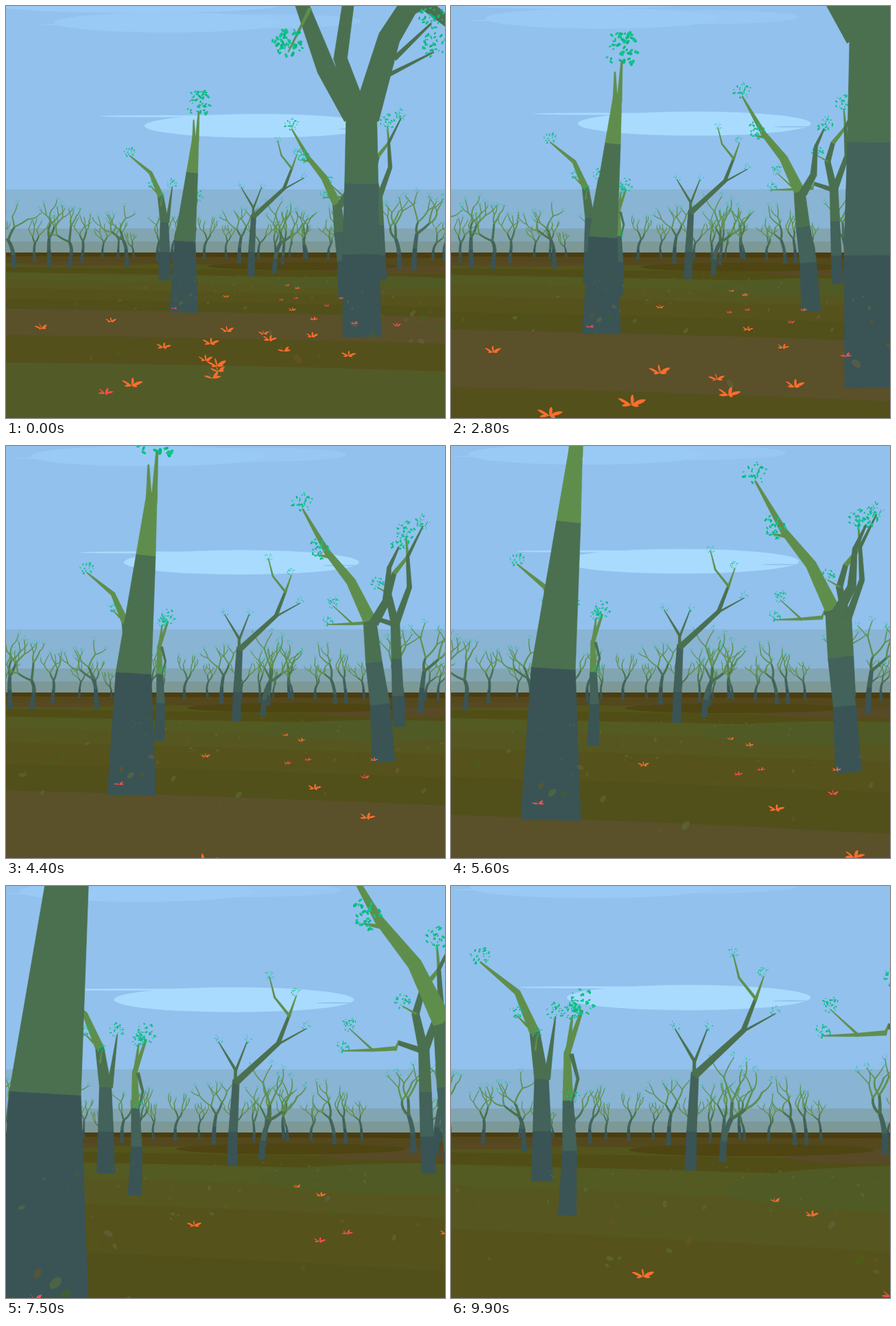
These frames come from a looping animation (640x600 px, 10 s). An HTML page with a canvas:

```html
<!DOCTYPE html>
<html lang="en">
<head>
<meta charset="utf-8">
<title>Forest walk</title>
<style>
html, body { margin: 0; width: 100%; height: 100%; overflow: hidden; background: #92c1ed; }
canvas { display: block; width: 640px; height: 600px; }
</style>
</head>
<body>
<canvas id="stage" width="640" height="600"></canvas>
<script>
const ctx = document.getElementById('stage').getContext('2d');
const W = 640, H = 600, HORIZON = 359, LOOP = 10000, STEP = 100, SPEED = 1.09, NEAR = .6;
const BARK = ['#3a5456', '#42625a', '#4b7050', '#5f8e4c'];
const LEAF = ['#06b97f', '#12c28c'];

function seeded(seed) {
  let a = seed * 2654435761 >>> 0;
  return () => {
    a = a + 0x6D2B79F5 | 0;
    let t = Math.imul(a ^ a >>> 15, 1 | a);
    t ^= t + Math.imul(t ^ t >>> 7, 61 | t);
    return ((t ^ t >>> 14) >>> 0) / 4294967296;
  };
}

// Where the walking direction lies on screen as the head turns: seconds, x.
const TURNS = [[0, 328], [1.5, 316.7], [2.8, 313], [4.4, 301], [6.7, 287], [8.4, 295], [10, 303.5]];

function heading(sec) {
  const last = TURNS.length - 1;
  const slope = i => {
    const a = TURNS[Math.max(0, i - 1)], b = TURNS[Math.min(last, i + 1)];
    return (b[1] - a[1]) / (b[0] - a[0]);
  };
  let i = 0;
  while (i < last - 1 && sec > TURNS[i + 1][0]) i++;
  const [t0, a] = TURNS[i], [t1, b] = TURNS[i + 1], d = t1 - t0, u = (sec - t0) / d;
  const ease = u * u * (3 - 2 * u);
  return a + (b - a) * ease + d * u * (1 - u) * ((1 - u) * slope(i) - u * slope(i + 1));
}

// Tree parts are measured in eye heights, with y pointing up.
function tuft(x, y, r, count = 28) {
  const rnd = seeded(Math.round(x * 91 + y * 337 + 1000));
  return LEAF.map(fill => {
    const path = new Path2D();
    for (let i = 0; i < count / 2; i++) {
      const a = rnd() * 6.28, d = r * Math.sqrt(rnd()), turn = rnd() * 3;
      const px = x + Math.cos(a) * d, py = y + Math.sin(a) * d, rx = r * (.07 + rnd() * .11);
      path.moveTo(px + rx * Math.cos(turn), py + rx * Math.sin(turn));
      path.ellipse(px, py, rx, rx * .55, turn, 0, 6.3);
    }
    return { path, fill };
  });
}

// A tapering limb, one bark shade per segment; thin tips carry leaves.
function limb(shades, w0, w1, pts, r = .15, leaves = 28) {
  const run = [0];
  for (let i = 1; i < pts.length; i++)
    run.push(run[i - 1] + Math.hypot(pts[i][0] - pts[i - 1][0], pts[i][1] - pts[i - 1][1]));
  const total = run[pts.length - 1];
  const sides = pts.map(([x, y], i) => {
    const a = pts[Math.max(0, i - 1)], b = pts[Math.min(pts.length - 1, i + 1)];
    const w = w0 + (w1 - w0) * (run[i] / total) ** 1.2;
    const k = w / 2 / Math.hypot(b[0] - a[0], b[1] - a[1]);
    const nx = (a[1] - b[1]) * k, ny = (b[0] - a[0]) * k;
    return [[x + nx, y + ny], [x - nx, y - ny]];
  });
  const parts = sides.slice(1).map((s, i) => {
    const path = new Path2D(), q = sides[i];
    path.moveTo(...q[0]);
    path.lineTo(...s[0]);
    path.lineTo(...s[1]);
    path.lineTo(...q[1]);
    path.closePath();
    return { path, fill: BARK[shades[Math.min(i, shades.length - 1)]], edge: true };
  });
  const [x, y] = pts[pts.length - 1];
  return w1 < .04 && r ? parts.concat(tuft(x, y + r * .6, r, leaves)) : parts;
}

// Branches fork, bow outwards and bend back towards the light.
function grow(seed) {
  const rnd = seeded(seed), parts = [];
  function branch(x, y, angle, w, level) {
    const len = (1.1 - .08 * level) * (.7 + rnd() * .6);
    const bend = -angle * .6 + (rnd() - .5) * (level ? 1.1 : .3);
    const tip = level > 3 ? .02 : w * .75, pts = [[x, y]];
    for (let i = 1; i < 5; i++) {
      const a = angle + bend * i / 4;
      pts.push([x += Math.sin(a) * len / 4, y += Math.cos(a) * len / 4]);
    }
    parts.push(...limb([Math.min(level, 3)], w, tip, pts, .17, 12));
    if (level > 3) return;
    const end = angle + bend;
    if (!level) return branch(x, y, end, tip, 1);
    branch(x, y, end + .35 + rnd() * .5, tip * .8, level + 1);
    if (level < 3 || rnd() > .4) branch(x, y, end - .35 - rnd() * .6, tip * .7, level + 1);
  }
  branch(0, 0, (rnd() - .5) * .16, .31, 0);
  return parts;
}

const spire = [
  limb('023', .47, .1, [[0, 0], [.02, 1.19], [.14, 2.34], [.2, 2.95]]),
  limb('3', .06, .015, [[.17, 2.85], [.165, 3.22]], 0),
  limb('3', .06, .02, [[.22, 2.85], [.25, 3.36]], .22, 40)
];

const giant = [
  limb('012', .46, .36, [[0, 0], [-.02, .98], [-.01, 1.82], [-.01, 2.74]]),
  limb('2', .26, .08, [[-.1, 2.62], [-.43, 3.18], [-.72, 3.95], [-.95, 4.8]]),
  limb('2', .18, .09, [[-.06, 2.75], [-.26, 3.3], [-.16, 4], [-.05, 5]]),
  limb('2', .32, .14, [[.04, 2.6], [.32, 3.55], [.66, 4.1], [1.2, 4.8]]),
  limb('2', .18, .08, [[.45, 3.85], [.75, 3.95], [1.3, 3.5]]),
  limb('2', .05, .015, [[.26, 3.08], [.85, 3.38]]),
  limb('2', .06, .02, [[.38, 3.3], [.82, 3.72]]),
  limb('3', .04, .012, [[-.62, 3.9], [-.88, 3.38]], .19, 44)
];

const hooked = [
  limb('01233', .44, .03, [[0, 0], [0, 1.03], [-.01, 2.12], [-.15, 3.07], [-.51, 3.9], [-1.28, 4.53]], .2),
  limb('2', .14, .02, [[.1, 2.1], [.28, 3.4]], .18),
  limb('3', .05, .015, [[-.3, 3.2], [-.52, 3.42]]),
  limb('3', .04, .015, [[-.14, 2.7], [-.1, 3]], .12)
];

const slim = [
  limb('0133', .22, .03, [[0, 0], [.03, .78], [.01, 1.39], [0, 1.96], [.18, 2.48]], .16, 44),
  limb('3', .07, .02, [[0, 1.9], [.06, 2.4]], .1),
  limb('2', .05, .02, [[.05, 1.95], [.13, 1.65], [.07, 1.4]], .08)
];

const forked = [
  limb('01', .3, .2, [[0, 0], [.03, 1.03], [.12, 2.6]]),
  limb('2233', .2, .02, [[.1, 2.5], [1.4, 3.7], [1.73, 4.55], [1.29, 5.1], [1.14, 5.7]], .14, 18),
  limb('3', .08, .02, [[1.72, 4.5], [1.95, 5.15]], .16, 18),
  limb('2', .06, .02, [[1.35, 3.65], [2.25, 4.15]], .14, 18),
  limb('2', .1, .02, [[.1, 2.5], [.1, 2.9], [-.41, 3.75]], .14, 16),
  limb('2', .07, .02, [[.1, 2.85], [.45, 3.75]], .14, 16)
];

const leaning = [
  limb('012333', .33, .02, [[0, 0], [-.05, .83], [-.14, 1.44], [-.2, 2.04], [-.47, 2.6], [-.81, 3.02], [-1.17, 3.65]]),
  limb('2', .14, .02, [[-.14, 2], [.04, 2.32], [.08, 2.8], [.22, 3.1]]),
  limb('3', .05, .015, [[-.75, 2.95], [-.94, 2.98]])
];

const crooked = [
  limb('012', .35, .26, [[0, 0], [-.04, .9], [-.08, 2], [-.12, 3.1]]),
  limb('2233', .24, .03, [[-.12, 3], [-.32, 3.9], [-.15, 4.5], [.25, 5], [.2, 5.6]], .28),
  limb('2', .2, .03, [[-.1, 3], [.3, 4.1], [.25, 5], [.7, 5.9]], .22),
  limb('2333', .14, .02, [[-.15, 3], [-.75, 3.2], [-.8, 3.06], [-1.4, 3.02], [-2.1, 3]], .17),
  limb('3', .05, .015, [[-1.35, 3], [-1.95, 3.55]], .17),
  limb('3', .05, .015, [[-.3, 3.9], [-.65, 4.1]], .2)
];

const trees = [];
const plant = (parts, x, z, size = 1) => trees.push({ parts: parts.flat(), x, z, size });

plant(spire, -.79, 11.49);
plant(giant, 1.56, 8.15);
plant(hooked, -2.42, 25);
plant(slim, -1.11, 19.1);
plant(forked, .84, 29);
plant(leaning, 2.47, 14.7);
plant(crooked, 5.5, 25);
plant(grow(5), -7.2, 47.5, .9);
plant(grow(8), 2.15, 34, .8);
plant(grow(21), 4.35, 58, .9);
plant(grow(13), 12.9, 120, 1.7);

// The grove fans out over all bearings, close by only at the sides.
const rndGrove = seeded(31);
for (let bearing = -345; bearing < 350; bearing += 25) {
  const side = Math.abs(bearing) > 225;
  const z = (side ? 20 : 62) + rndGrove() * (side ? 85 : 90);
  plant(grow(bearing + 900), (bearing + rndGrove() * 16) * z / 1000, z, .65 + rndGrove() * .35 + z / 400);
}
trees.sort((a, b) => b.z - a.z);

// Ground stripes, far to near: colour and distance.
const STRIPES = [
  ['#4c3d10', 1e4], ['#55491a', 150], ['#54481f', 90], ['#53551a', 56], ['#504e16', 40],
  ['#535a22', 29], ['#565720', 22], ['#56521b', 17.2], ['#514f1a', 13.6], ['#5a5029', 11.35],
  ['#54501b', 7.9], ['#525a28', 6]
];
// Ground patches: colour, place, distance, half width, half depth.
const PATCHES = [
  ['#594a27', 9.4, 39, 4.2, 8], ['#584823', -13, 62, 6, 12],
  ['#4e4512', 5.3, 50, 7, 14], ['#505a25', 4.5, 23, 3.3, 5]
];

function flower(x, z, seed) {
  const rnd = seeded(seed), path = new Path2D(), turn = rnd() * 6, lift = .1 + rnd() * .2;
  for (let k = 0; k < 5; k++) {
    const a = turn + k * 1.257, px = Math.cos(a), py = Math.sin(a) * .42 + lift;
    path.moveTo(0, -.1);
    path.quadraticCurveTo(px * .55 - py * .35, py * .6 + .22, px, py);
    path.quadraticCurveTo(px * .6 + py * .35, py * .4 - .24, 0, -.1);
  }
  const red = rnd() > .8;
  return { x, z, path, r: red ? .06 : .065 + rnd() * .035, fill: red ? '#f9504c' : '#ff6d2e' };
}

// A few flowers mark the path, the rest lie scattered at its start.
const blooms = [
  [-.11, 15.6], [-1.02, 12.3], [1.07, 12], [1.06, 14.5], [1.42, 15],
  [1.85, 19.1], [1.7, 20.8], [1.24, 10.3], [1.8, 12.9], [2.4, 15]
].map(([x, z], i) => flower(x, z, i + 400));
const rndBloom = seeded(12);
for (let i = 0; i < 18; i++) {
  const z = 4.9 + i * .3;
  blooms.push(flower((rndBloom() * 560 - 310) * z / 1000, z, i + 500));
}

const rndLitter = seeded(77);
const litter = Array.from({ length: 130 }, () => ({
  x: (rndLitter() - .45) * 7, y: rndLitter() * .2, z: 5 + rndLitter() * 24,
  r: .015 + rndLitter() * .03, turn: rndLitter() * 3,
  fill: ['#476318', '#5c7038', '#6a5522', '#6b6044'][rndLitter() * 4 | 0]
}));

function oval(fill, x, y, rx, ry, turn = 0) {
  ctx.fillStyle = fill;
  ctx.beginPath();
  ctx.ellipse(x, y, rx, ry, turn, 0, 7);
  ctx.fill();
}

function bar(fill, y) {
  ctx.fillStyle = fill;
  ctx.fillRect(0, y, W, H - y);
}

function drawSky(sec, cx) {
  bar('#92c1ed', 0);
  const g = 177 / (177 - SPEED * sec);
  const cloud = (fill, x, y, rx, ry) =>
    oval(fill, cx + (x - 328) * g, HORIZON + (y - HORIZON) * g, rx * g, ry * g);
  cloud('#97c7f2', 390, 22, 128, 10);
  cloud('#99caf5', 236, 24, 166, 14.5);
  cloud('#9acbf6', 190, -1, 208, 11);
  cloud('#9acbf6', 165, 27, 122, 1.2);
  cloud('#a9dbff', 369, 174.5, 167, 17.3);
  cloud('#a9dbff', 232, 160.5, 94, 1.4);
  cloud('#92c1ed', 510, 179, 27, .9);
  bar('#89b4d4', 267);
  bar('#82a5b2', 324);
  bar('#7c9997', 343);
}

function drawGround(sec, view) {
  for (const [fill, z0] of STRIPES) {
    const z = z0 - SPEED * sec;
    if (z < NEAR) break;
    const slant = Math.min(.02 * z0, .5);
    const edge = x => HORIZON + (1000 + slant * (x - view.cx)) / z;
    ctx.fillStyle = fill;
    ctx.beginPath();
    ctx.moveTo(0, edge(0));
    ctx.quadraticCurveTo(W / 2, edge(W / 2) - 20 / z, W, edge(W));
    ctx.lineTo(W, H);
    ctx.lineTo(0, H);
    ctx.fill();
  }
  for (const [fill, x, z, rx, rz] of PATCHES) {
    const p = view.at(x, z);
    if (p) oval(fill, p.x, p.y, rx * p.s, p.s * p.s * rz / 1000);
  }
}

// Runs paint in a space one eye height tall, standing on the ground.
function stand(item, size, view, paint) {
  const p = view.at(item.x, item.z);
  if (!p || Math.abs(p.x - W / 2) > 1300) return;
  const k = p.s * size;
  ctx.save();
  ctx.translate(p.x, p.y);
  ctx.scale(k, -k);
  ctx.lineWidth = .6 / k;
  paint();
  ctx.restore();
}

function drawTree(parts) {
  for (const { path, fill, edge } of parts) {
    ctx.fillStyle = ctx.strokeStyle = fill;
    ctx.fill(path);
    if (edge) ctx.stroke(path);
  }
}

function draw(sec) {
  const cx = heading(sec);
  const view = {
    cx,
    at(x, z0) {
      const s = 1000 / (z0 - SPEED * sec);
      return s > 0 && s < 1000 / NEAR ? { x: cx + x * s, y: HORIZON + s, s } : null;
    }
  };
  drawSky(sec, cx);
  drawGround(sec, view);
  for (const t of trees) stand(t, t.size, view, () => drawTree(t.parts));
  ctx.globalAlpha = .55;
  for (const l of litter) {
    const p = view.at(l.x, l.z);
    if (p) oval(l.fill, p.x, p.y - l.y * p.s, l.r * p.s, l.r * p.s * .6, l.turn);
  }
  ctx.globalAlpha = 1;
  for (const b of blooms) stand(b, b.r, view, () => {
    ctx.fillStyle = b.fill;
    ctx.fill(b.path);
  });
}

const start = performance.now();
let shown = -1;
function tick() {
  const t = Math.floor((performance.now() - start) % LOOP / STEP) * STEP;
  if (t !== shown) draw((shown = t) / 1000);
  requestAnimationFrame(tick);
}
tick();
</script>
</body>
</html>
```
